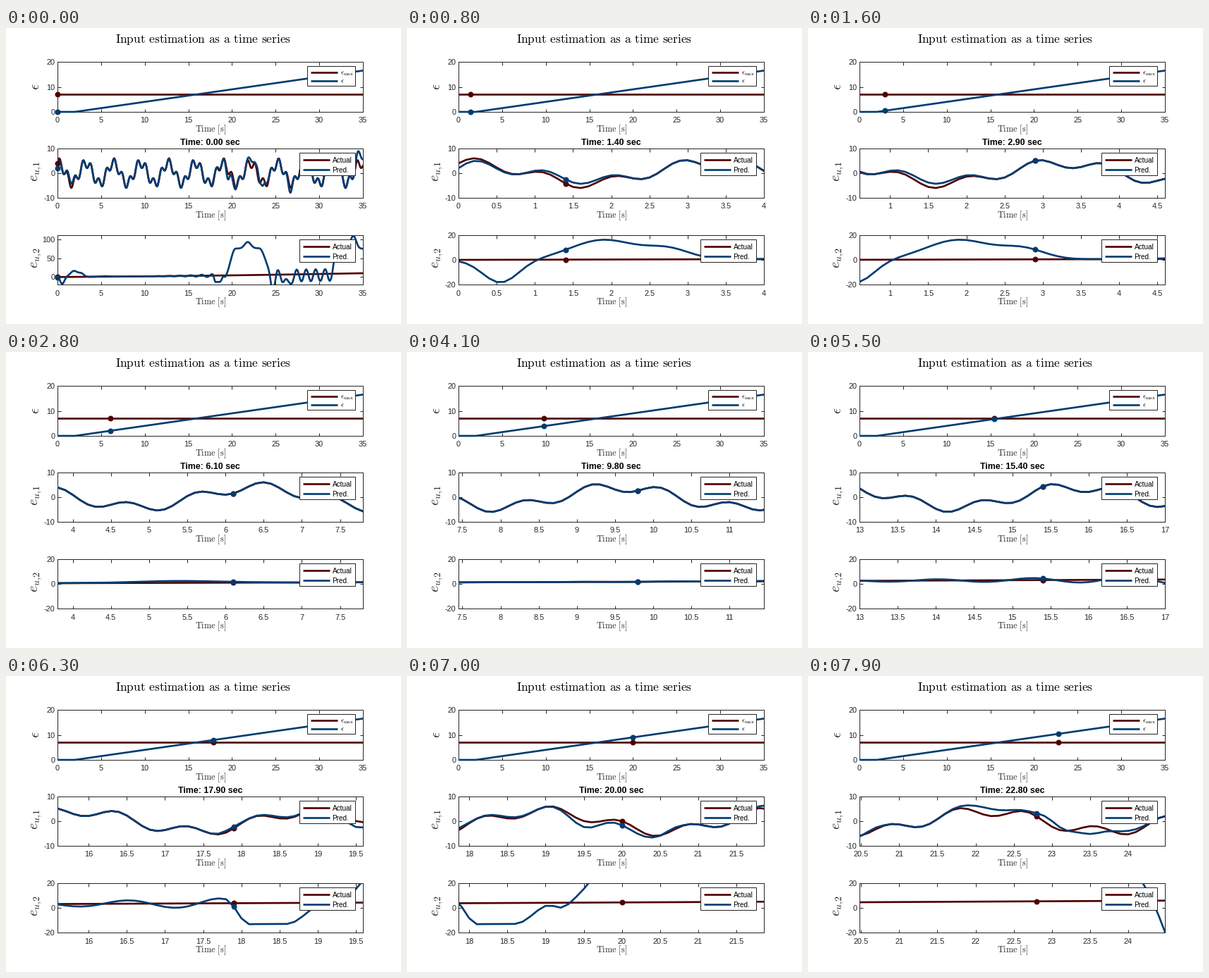
Animation, 560 px wide and 420 px high, one loop 8 s. Source, as a matplotlib script:

```python
import numpy as np
import matplotlib.pyplot as plt
from matplotlib.animation import FuncAnimation
from matplotlib.patches import Rectangle
from matplotlib.ticker import FormatStrFormatter, MultipleLocator

W, H, DPI = 560, 420, 100
PT = 72 / DPI  # points per pixel
RED, BLUE, GRAY = "#500000", "#003C71", "#262626"
FRAMES, SPAN, T_END = 80, 4, 35

plt.rcParams.update({
    "font.family": "Liberation Sans",
    "mathtext.fontset": "cm",
    "axes.unicode_minus": False,
})


def step(t, a, b):
    """Smooth rise from 0 at a to 1 at b."""
    s = np.clip((t - a) / (b - a), 0, 1)
    return s * s * (3 - 2 * s)


def plateau(t, a, b, c, d):
    return step(t, a, b) - step(t, c, d)


def bumps(t, *items):
    """Sum of bell curves given as (centre, height, width)."""
    return sum(h * np.exp(-((t - c) / w) ** 2) for c, h, w in items)


# Signals
t = np.arange(0, T_END + 0.05, 0.1)
eps_max = np.full_like(t, 7.0)
eps = np.maximum(0, 0.5 * (t - 2))

actual1 = 4 * np.cos(2 * t) + np.sin(2 * t) + 2 * np.sin(7 * t)
settle1 = -2 * np.exp(-3 * t) + bumps(t, (1.5, 1.8, 0.45))
drift1 = bumps(t, (17.85, 0.8, 0.15), (18.5, 0.6, 0.25), (19.5, -2.4, 0.25),
               (20.12, -1.9, 0.28), (20.65, 0.8, 0.12), (22.15, 3, 0.3),
               (22.95, 2.5, 0.18), (23.52, -3.2, 0.2), (24, 1.4, 0.22),
               (26.6, -2.2, 0.3), (34.65, 5, 0.4))
pred1 = actual1 + settle1 + drift1

actual2 = 0.13 * t + 0.0045 * t ** 2
settle2 = bumps(t, (0.55, -18.5, 0.33), (1.9, 16, 0.6), (2.75, 8, 0.4),
                (5.4, 1.5, 0.8))
wiggle = np.exp(0.4 * (t - 14)) * np.cos(5.03 * (t - 14))
ripple = 16 * np.cos(5.8 * (t - 28.5)) - 3
drift2 = (wiggle * (1 - step(t, 17.6, 18.2))
          - 17 * plateau(t, 17.8, 18.1, 18.6, 19.1)
          + 71 * plateau(t, 19.2, 20.4, 23.1, 24.7)
          + ripple * plateau(t, 24.6, 25.2, 31.2, 32)
          + 65 * step(t, 31.4, 32)
          + bumps(t, (19.2, -4, 0.15), (21.8, 17, 0.5), (24.65, -42, 0.28),
                  (26.4, -28, 0.35), (33.9, 35, 0.45)))
pred2 = actual2 + settle2 + drift2

# Stage: an overlay in pixel units carries text and legends
fig = plt.figure(figsize=(W / DPI, H / DPI), dpi=DPI, facecolor="white")
page = fig.add_axes([0, 0, 1, 1], zorder=5)
page.set(xlim=(0, W), ylim=(H, 0))
page.axis("off")


def label(x, y, s, size, **kw):
    kw = {"ha": "center", "va": "baseline", "color": GRAY, **kw}
    return page.text(x, y, s, fontsize=size * PT, **kw)


def roman(s):
    return r"$\mathrm{%s}$" % s.replace(" ", r"\hspace{0.38}")


def side_label(x, y, s):
    label(x, y, s, 20, rotation=90, rotation_mode="anchor")


def legend(x, y, w, h, rows, names):
    page.add_patch(Rectangle((x, y), w, h, fc="white", ec=GRAY, lw=PT))
    for row, color, name in zip(rows, (RED, BLUE), names):
        page.plot([x + 4.5, x + 42.5], [row, row], color=color, lw=2.67 * PT,
                  solid_capstyle="butt")
        label(x + 46.5, row + 3.6, name, 10, ha="left", color="black")


def panel(top, bottom, ylim, ystep):
    ax = fig.add_axes([73 / W, 1 - bottom / H, 433 / W, (bottom - top) / H])
    ax.set(xlim=(0, T_END), ylim=ylim)
    ax.xaxis.set_major_locator(MultipleLocator(5))
    ax.yaxis.set_major_locator(MultipleLocator(ystep))
    for axis, pad in ((ax.xaxis, 7.5), (ax.yaxis, 3.5)):
        axis.set_major_formatter(FormatStrFormatter("%g"))
        axis.set_tick_params(direction="in", length=4.5 * PT, width=PT,
                             color=GRAY, labelcolor=GRAY, pad=pad * PT,
                             labelsize=11 * PT)
    ax.tick_params(top=True, right=True)
    for spine in ax.spines.values():
        spine.set(color=GRAY, linewidth=PT, zorder=1)
    label(290, bottom + 28, roman("Time [s]"), 12.2)
    return ax


def curves(ax, series, clip):
    dots = []
    for k, (y, color) in enumerate(zip(series, (RED, BLUE))):
        ax.plot(t, y, color=color, lw=2.67 * PT, zorder=3 + k, clip_on=clip,
                solid_capstyle="butt", solid_joinstyle="round")
        dots += ax.plot([], [], "o", color=color, ms=8 * PT, mew=0,
                        zorder=5 + k, clip_on=False)
    return dots


ax0 = panel(48, 119, (0, 20), 10)
ax1 = panel(171, 241, (-10, 10), 10)
ax2 = panel(294, 364, (-20, 20), 20)
plots = [(ax, series, curves(ax, series, ax is not ax0))
         for ax, series in ((ax0, (eps_max, eps)), (ax1, (actual1, pred1)),
                            (ax2, (actual2, pred2)))]

label(280, 21, roman("Input estimation as a time series"), 17.3,
      color="black")
clock = label(289.5, 166, "", 12.4, weight="bold", color="black")
side_label(47, 83.5, r"$\epsilon$")
side_label(45, 203, r"$e_{u,\hspace{-0.2}1}$")
side_label(45, 326, r"$e_{u,\hspace{-0.2}2}$")
legend(427, 54, 68, 28, (63, 75), (r"$\epsilon_{\mathrm{max}}$",
                                   r"$\epsilon$"))
legend(416, 177, 79, 32, (187, 201), ("Actual", "Pred."))
legend(416, 300, 79, 32, (310, 324), ("Actual", "Pred."))

# Playback clock and how far the view trails behind it
KEYS = [0, 16, 28, 41, 55, 70, 79]
CLOCK = [0, 2.9, 6.1, 9.8, 15.4, 20, 22.8]
LAG = [2.3, 2.3, 2.3, 2.35, 2.4, 2.14, 2.32]


def update(n):
    time = np.interp(n, KEYS, CLOCK)
    i = int(round(time * 10))
    left = max(0, time - np.interp(n, KEYS, LAG))
    overview = n == 0
    for ax in (ax1, ax2):
        ax.set_xlim(left, T_END if overview else left + SPAN)
        ax.xaxis.set_major_locator(MultipleLocator(5 if overview else 0.5))
    ax2.set_ylim(-20, 111 if overview else 20)
    ax2.yaxis.set_major_locator(MultipleLocator(50 if overview else 20))
    for ax, series, dots in plots:
        low, high = ax.get_ylim()
        for y, dot in zip(series, dots):
            dot.set_data([t[i]], [y[i] if low <= y[i] <= high else np.nan])
    clock.set_text(f"Time: {t[i]:.2f} sec")
    return []


anim = FuncAnimation(fig, update, frames=FRAMES, interval=100, repeat=True,
                     repeat_delay=0, blit=False)
plt.show()
```
